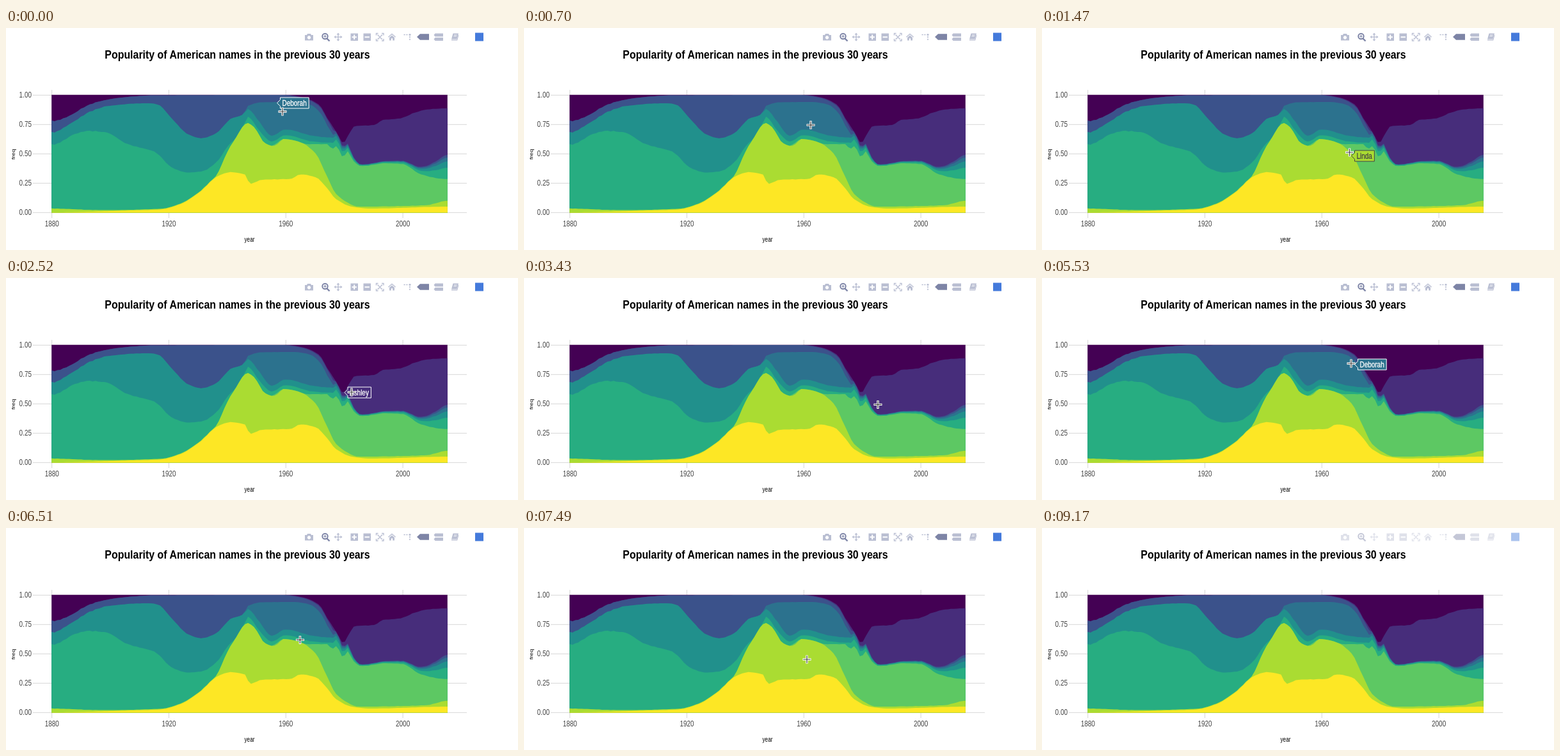
An HTML page for the animation above (9240 ms loop, 800 by 348 pixels).

```html
<!DOCTYPE html>
<html lang="en">
<head>
<meta charset="utf-8">
<title>Popularity of names</title>
<style>
  html, body { margin: 0; width: 100%; height: 100%; overflow: hidden; background: #fff; }
  svg { display: block; width: 800px; height: 348px; }
  text { font-family: "Liberation Sans", Arial, sans-serif; }
</style>
</head>
<body>
<svg id="stage" viewBox="0 0 800 348">
  <g id="grid" stroke="#d6d6d6" fill="none"></g>
  <g id="areas"></g>
  <g id="labels"></g>
  <g id="toolbar" fill="#b9bed2" stroke="none">
    <path fill-rule="evenodd" d="M467 11h3l1-2h5l1 2h3v8.500h-13zM473.500 12.300a2.700 2.700 0 1 0 .01 0z"/>
    <g fill="none" stroke="#7d84a6">
      <circle cx="498.500" cy="13" r="4.200" stroke-width="2"/>
      <path d="M501.500 16.500l4 4" stroke-width="2.400"/>
      <path d="M496.300 13h4.400M498.500 10.800v4.400" stroke-width="1.200"/>
    </g>
    <path d="M519 7.500l2.400 3h-1.700v2.900h2.900v-1.700l2.900 2.400-2.900 2.400v-1.700h-2.900v2.900h1.700l-2.400 3-2.400-3h1.700v-2.900h-2.900v1.700l-2.900-2.400 2.900-2.400v1.700h2.900v-2.900h-1.700z"/>
    <path fill-rule="evenodd" d="M538.500 8.500h11.500v11.500h-11.500zM543.200 10.500v2.700h-2.700v2h2.700v2.700h2v-2.700h2.700v-2h-2.700v-2.700z"/>
    <path fill-rule="evenodd" d="M558.500 8.500h11.500v11.500h-11.500zM560.500 13.200v2h7.500v-2z"/>
    <path fill="none" stroke="#b9bed2" stroke-width="1.400" d="M578.500 11.500v-3h3M587 8.500h3v3M590 17v3h-3M581.500 20h-3v-3M580.500 10.500l7.500 7.500M588 10.500l-7.500 7.500"/>
    <path d="M603 8.500l6 5.300-.8.900-5.200-4.500-5.200 4.500-.8-.9zM603 11.500l4 3.500v4.500h-2.800v-3.200h-2.400v3.200h-2.800v-4.500z"/>
    <path fill="none" stroke="#b9bed2" stroke-width="1.600" stroke-dasharray="2.200 1.600" d="M621.500 10.500h7M631 13v7"/>
    <circle cx="631" cy="10.500" r="1.600"/>
    <path fill="#7d84a6" d="M642 14l5-4.800h14v9.600h-14z"/>
    <path d="M668.500 11l2-2.500h12.500v5h-12.500zM668.500 17.500l2-2.500h12.500v5h-12.500z"/>
    <path d="M698.500 8.500h8.500l-2.500 9h-8.500zM696 18.300h8.500l2.200-7.500.8.400-2.300 8.300h-9.200z"/>
    <path stroke="#fff" stroke-width=".8" d="M700 11h4.500M699.400 13h4.500"/>
    <rect x="733" y="7.500" width="13" height="13" fill="#447adb"/>
  </g>
  <g id="tip">
    <path/>
    <text font-size="12" stroke-width=".3" transform="translate(8 4.300) scale(.83 1)"></text>
  </g>
  <g id="cursor" fill="none">
    <path d="M-6.500 0h13M0-6.500v13" stroke="#fff" stroke-width="3.400"/>
    <path d="M-5.700 0h11.400M0-5.700v11.400" stroke="#444" stroke-width="1.200"/>
  </g>
</svg>
<script>
const LOOP = 9240, STEP = 70, SQUEEZE = 0.83;
const LEFT = 71.2, RIGHT = 689.8, TOP = 104.8, BOTTOM = 289.5, YEARS = 135;
const $ = id => document.getElementById(id);

function add(parent, tag, attrs, content) {
  const el = document.createElementNS('http://www.w3.org/2000/svg', tag);
  for (const key in attrs) el.setAttribute(key, attrs[key]);
  if (content) el.textContent = content;
  return parent.appendChild(el);
}

// Smooth curve through a few "x,y" keys without overshoot; no value before the first key.
function curve(keys) {
  const p = keys.split(' ').map(k => k.split(',').map(Number));
  const rise = i => p[i + 1] && p[i] ? (p[i + 1][1] - p[i][1]) / (p[i + 1][0] - p[i][0]) : 0;
  const slope = i => {
    const a = rise(i - 1), b = rise(i);
    return a * b > 0 ? 2 * a * b / (a + b) : 0;
  };
  return x => {
    if (x < p[0][0]) return Infinity;
    const i = p.findIndex(k => k[0] > x) - 1;
    if (i < 0) return p[p.length - 1][1];
    const w = p[i + 1][0] - p[i][0], u = (x - p[i][0]) / w, v = 1 - u;
    return v * v * (1 + 2 * u) * p[i][1] + u * u * (3 - 2 * u) * p[i + 1][1]
      + u * v * w * (v * slope(i) - u * slope(i + 1));
  };
}
const above = (lower, own) => x => Math.min(lower(x), own(x));

const yellow = curve('71,289 180,286.5 240,284.5 270,277 300,259.5 332,231.5 351,226 374,230 381,244 400,238 445,236.5 460,229.5 484,234 500,249 515,267.5 540,280 570,283 690,280');
const lime = above(x => yellow(x) - 0.8,
  curve('71,283 150,285.5 250,283 300,262 318,245 330,229 345,196 356,177 378,149 388,156 405,181 418,185 435,174 460,179 484,197 500,229 515,259 530,271.5 550,280 655,278 690,271'));
const green = above(lime,
  curve('412,186 435,174 470,182 503,182 509,190 516,185 527,203 533,193 543,209 555,216.5 595,212 620,213.5 650,230 690,237'));

// Late bands share one fan that opens above the green band.
const FAN_START = 512;
const fan = curve('510,24 527,16 555,2.5 620,5 652,13 670,25 690,38');
const fanned = (share, early) => x => x < FAN_START ? early(x) : green(x) - share * fan(x);

const mint = above(green, fanned(.47,
  curve('71,183 110,165 128,161.5 155,163 190,182 232,194 260,219 285,226.5 305,225 330,209 345,187 369,161 378,139 395,160 415,178 437,168 480,178 514,180')));
const teal = above(mint, fanned(.73,
  curve('71,164 100,150 130,132 160,122 222,118 237,120 260,143 285,167 305,173 328,165 352,142 370,136 378,127 395,146 415,169 437,159 480,169 514,172')));
const steel = above(teal, fanned(.89,
  curve('370,136 378,122 400,116.5 450,116 475,120 492,134 505,158 514,169')));
const blue = above(steel, fanned(1,
  curve('71,146 100,137 122,124 150,114 190,108 235,105.5 430,105 465,110 490,123 503,145 514,162')));
const violet = above(blue,
  curve('440,105 465,109 490,121 503,143 515,161 527,180 535,168 545,154 575,152 590,144 615,142 640,132 665,127 690,126'));

// Yearly wobble, strongest in the early years and fading near the plot's rim.
function wobble(year, y) {
  const hash = Math.sin(year * 127.1 + 3) * 43758.5453;
  const rim = Math.max(0, Math.min(1, (y - TOP) / 20, (BOTTOM - y) / 20));
  return (hash - Math.floor(hash) - .5) * rim * (.7 + 2.2 * Math.exp(-year / 10));
}

function area(edge) {
  let d = `M${LEFT} ${BOTTOM}`;
  for (let year = 0; year <= YEARS; year++) {
    const x = LEFT + (RIGHT - LEFT) * year / YEARS, y = edge(x);
    d += `L${x.toFixed(1)} ${Math.max(TOP, y + wobble(year, y)).toFixed(1)}`;
  }
  return d + `V${BOTTOM}Z`;
}

function text(x, y, size, content, anchor, style, turn = '') {
  add($('labels'), 'text', {
    transform: `translate(${x} ${y}) scale(${SQUEEZE} 1) ${turn}`,
    'font-size': size, 'text-anchor': anchor, fill: '#444', ...style
  }, content);
}

for (let i = 0; i < 5; i++) {
  const y = 289 - 46 * i;
  add($('grid'), 'path', { d: `M42 ${y + .3}H720` });
  text(40, y + 4.3, 12, (i / 4).toFixed(2), 'end');
}
for (let i = 0; i < 4; i++) {
  const x = 71.7 + 182.8 * i;
  add($('grid'), 'path', { d: `M${x} 97V298` });
  text(x, 311, 12, 1880 + 40 * i, 'middle');
}
[
  ['#440154', () => TOP], ['#472d7b', violet], ['#3b528b', blue], ['#2c728e', steel],
  ['#21908c', teal], ['#27ad81', mint], ['#5dc863', green], ['#aadc32', lime], ['#fde725', yellow]
].forEach(([fill, edge]) => add($('areas'), 'path', { fill, d: area(edge) }));

const black = { fill: '#000' };
text(361.5, 48, 19.2, 'Popularity of American names in the previous 30 years', 'middle',
  { 'font-weight': 'bold', ...black });
text(380.5, 335, 10, 'year', 'middle', black);
text(14, 198, 9.6, 'freq', 'middle', black, 'rotate(-90)');

const tones = {
  Ashley: ['#472d7b', '#fff'], Deborah: ['#2c728e', '#fff'],
  Dorothy: ['#21908c', '#fff'], Linda: ['#aadc32', '#444']
};
// Pointer rests: arrive, leave, x, y, label and its offset
const rests = [
  [0, 350, 432, 131, 'Deborah', -8.5, -13.5],
  [1260, 1680, 480.5, 195, 'Linda', 3, 5.5],
  [2380, 2730, 540, 179, 'Ashley', -11, .5],
  [4060, 4550, 564, 215, 'Dorothy', 2.5, 2.5],
  [5390, 5740, 483, 134, 'Deborah', 5.5, 1.5],
  [7140, 7910, 442, 206],
  [8890, LOOP, 440, 356]
];
const LINGER = 280;

function pointerAt(t) {
  const i = rests.findIndex(r => t < r[1]);
  const [arrive, , x1, y1] = rests[i];
  if (t >= arrive) return [x1, y1];
  const [, leave, x0, y0] = rests[i - 1];
  const u = (t - leave) / (arrive - leave), e = u * u * (3 - 2 * u);
  return [x0 + (x1 - x0) * e, y0 + (y1 - y0) * e];
}

const [tipBox, tipText] = $('tip').children;
function showTip(rest) {
  $('tip').style.display = rest ? '' : 'none';
  if (!rest) return;
  const [, , x, y, name, dx, dy] = rest, [fill, ink] = tones[name];
  $('tip').setAttribute('transform', `translate(${x + dx} ${y + dy})`);
  tipText.textContent = name;
  tipText.setAttribute('fill', ink);
  tipText.setAttribute('stroke', ink);
  const width = tipText.getComputedTextLength() * SQUEEZE + 6.5;
  tipBox.setAttribute('d', `M0 0L5 5v3.500h${width}v-17H5V-5Z`);
  tipBox.setAttribute('fill', fill);
  tipBox.setAttribute('stroke', ink);
}

function draw() {
  const t = Math.floor((performance.now() % LOOP) / STEP) * STEP;
  $('cursor').setAttribute('transform', `translate(${pointerAt(t)})`);
  showTip(rests.find(r => r[4] && t >= r[0] - LINGER && t < r[1] + LINGER));
  $('toolbar').setAttribute('opacity', Math.min(1, 1 - (t - 8960) / 380));
  requestAnimationFrame(draw);
}
draw();
</script>
</body>
</html>
```
